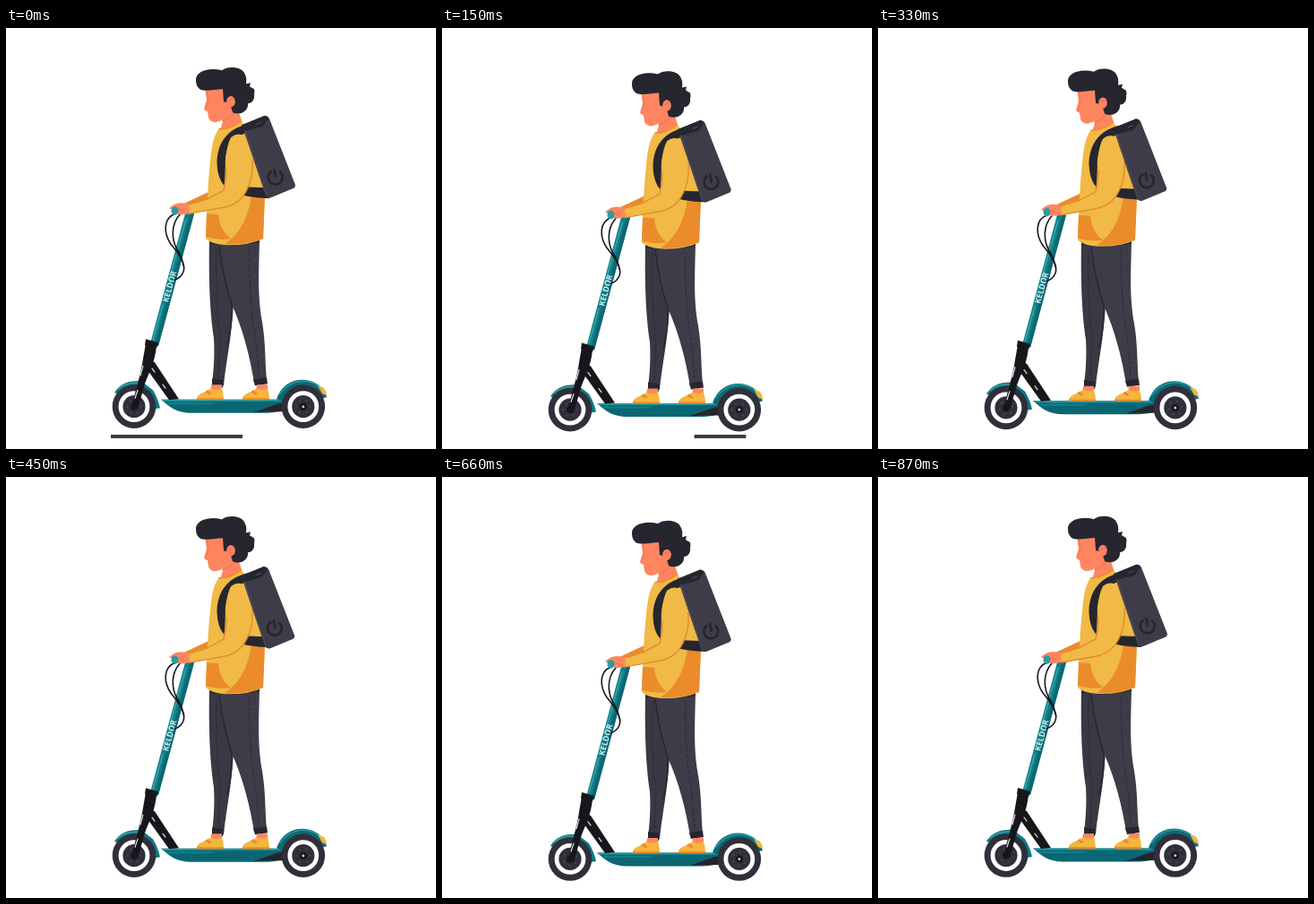
Recreate the animation shown at these times as an HTML page. Size 480 px wide and 470 px high, loop 900 ms.

```html
<!DOCTYPE html>
<html lang="en">
<head>
<meta charset="utf-8">
<title>Scooter ride</title>
<style>
  html, body { margin: 0; width: 100%; height: 100%; overflow: hidden; background: #fff; }
  svg { display: block; width: 480px; height: 470px; }
  .ink { fill: #26262f; }
  .cloth { fill: #3d3c48; }
  .skin { fill: #ff8561; }
  .shade { fill: #ea8b2c; }
  .shirt { fill: #f1b946; }
  .teal { fill: #0e7681; }
  .black { fill: #17171b; }
  .line { fill: none; stroke-linecap: round; stroke-linejoin: round; }
  text { font: 700 9px "Open Sans", Arial, sans-serif; fill: #d3eeee; }
</style>
</head>
<body>
<svg viewBox="0 0 480 470">
  <defs>
    <linearGradient id="glow">
      <stop offset="0" stop-color="#fdf3da" stop-opacity=".5"/>
      <stop offset=".5" stop-color="#f7dda3"/>
      <stop offset="1" stop-color="#edbd5c"/>
    </linearGradient>
    <g id="shoe">
      <path class="skin" d="M16 -2H28V6H15Z"/>
      <path d="M0 14C0 10 4 8 9 6L16 2Q22 5 28 2Q30 8 30 14Z" fill="#f6b53b"/>
      <path class="shade" d="M0 13H30V15H0ZM9 6L12 4L17 8L14 9Z"/>
    </g>
    <g id="wheel">
      <circle r="24.300" fill="#302f3a"/>
      <circle r="15" fill="#302f3a" stroke="#fff" stroke-width="4.800"/>
      <g class="spin"></g>
      <circle r="4" fill="#17171b"/>
      <circle r="1.500" fill="#c4c4ca"/>
    </g>
  </defs>

  <rect id="road" y="454" height="4" class="cloth"/>

  <g id="ride">
    <path id="beam" d="M136 190.500L170 196Q176 197 176 201.500T170 207L136 212.500Z" fill="url(#glow)"/>

    <!-- legs -->
    <path d="M227 236C226 285 228 320 232 346C233 365 232 380 230 397L243 399C246 370 252 345 254 306L262 238Z" fill="#393843"/>
    <path class="cloth" d="M238 236H283C282 278 281 300 286 328C290 352 289 374 291 393L277 396C272 365 265 338 252 308C247 288 240 262 238 236Z"/>
    <path class="line" d="M238 243C241 268 246 290 252 308C253 320 250 341 247 355" stroke="#26262f" stroke-width="1.300"/>
    <path class="line" d="M272 245C271 280 273 310 277 337Q281 365 282 389M235 246C234 290 236 325 239 345L237 391" stroke="#292832" stroke-width="1" stroke-dasharray="3 3"/>
    <path class="ink" d="M227 237L283 234V239Q260 244 228 241ZM230 391L243 393L242 401L230 399ZM276 392L291 390L292 397L278 399Z"/>

    <!-- deck -->
    <path d="M173 414.500H311V425Q304 429 292 429.500H207C190 429.500 183 423 173 414.500Z" fill="#0a6673"/>
    <path d="M173 414.500H311V416.500H176Z" fill="#2398a0"/>
    <path d="M178 418H236L228 420H181Z" fill="#11808a"/>
    <path d="M276 429L304 419H331V428H290Z" fill="#26252b"/>
    <use href="#shoe" x="213" y="400"/>
    <use href="#shoe" x="264" y="400"/>

    <!-- mudguards -->
    <path d="M302 414C307 399 319 392 332 392.500C345 393 355 401 358 412L349 414Q342 402 331 402Q316 402 309 417Z" fill="#0b6875"/>
    <path class="line" d="M305 409Q316 394 332 394Q344 394 352 402" stroke="#2398a0" stroke-width="1.500"/>
    <path d="M348 399L354 401Q358 405 358 410L353 408Z" fill="#f2b444"/>
    <path class="teal" d="M121 407C127 397 137 393 151 394L164 404Q170 414 172 424L166 425Q160 404 143 401Q131 401 125 408Z"/>
    <path class="line" d="M125 403Q134 395 149 396" stroke="#39a4a9" stroke-width="1.300"/>
  </g>

  <g id="wheels">
    <use href="#wheel" x="143" y="422.500"/>
    <use href="#wheel" x="331.800" y="422.500"/>
  </g>

  <g id="rider">
    <!-- fork and stem -->
    <path class="black" d="M157 369L166 373L193 414L182 415L159 383Z"/>
    <path class="black" d="M156 352L168 355C166 374 160 383 155 397L147 425L140 424C145 402 151 385 153 369Z"/>
    <path class="line" d="M153 377L150 388M163 380L166 384M175 398L178 402M147 404L144 413" stroke="#dedee2" stroke-width="1.200"/>
    <path d="M200.500 205L210 207L170 355L161 352Z" fill="#11808a"/>
    <path d="M206 206L210 207L170 355L166 354Z" fill="#0c6872"/>
    <path class="line" d="M201 213L182 280M175 309L164 348" stroke="#3aa8ad" stroke-width="1.300"/>
    <path class="black" d="M156 347L170 351L168 357L155 354Z"/>
    <text transform="translate(181 306.500) rotate(-74.500)">KELDOR</text>
    <path class="line" d="M189 207C175 212 176 229 184 241C195 254 201 264 198 272Q195 279 188 281M194 208C184 219 185 235 190 245Q197 256 198 265" stroke="#17171b" stroke-width="1.600"/>

    <!-- far arm, neck, face -->
    <path class="shade" d="M198 196L230 181V196L203 203Z"/>
    <path class="skin" d="M241 94L258 88L264 106Q252 116 239 115L242 104Z"/>
    <path class="line" d="M242 103.500Q250 101 254 95" stroke="#f17450" stroke-width="1.300"/>
    <path class="skin" d="M222 66L224 80L221 90Q222 92 225 93L226 100Q228 105 234 105Q244 103 252 94L258 66Z"/>
    <path class="line" d="M224 71L226 80L223 88" stroke="#f77653" stroke-width="1.300"/>
    <path class="ink" d="M212 58.500C211 49 225 43 241 47C247 42 264 42 267 52Q269 56 268 62L273 61L272 65L277 68Q278 71 277 74C278 80 274 84 270 84C271 92 262 98 253 94L250 84L243 82L242 68C234 68 224 71 217 68.500Q212 65 212 58.500Z"/>
    <ellipse class="skin" cx="251" cy="82" rx="4.800" ry="6.200"/>
    <path class="line" d="M249 82Q250 78 254 79" stroke="#e96d4b" stroke-width="1.200"/>

    <!-- torso -->
    <path class="shirt" d="M238 112Q250 113 262 103L273 116L289 184L287 235Q270 243 245 242Q229 241 223 235C224 205 225 176 228 148C230 129 232 119 238 112Z"/>
    <path class="shade" d="M224 207L237 208C238 220 243 229 251 235Q237 237 223 233ZM274 186H289L287 235Q270 242 244 241C262 229 271 210 274 186Z"/>
    <path class="line" d="M238 112.500Q250 113 262 104" stroke="#ea8b2c" stroke-width="1.500"/>

    <!-- straps -->
    <path class="ink" d="M270 107C247 112 236 128 235.500 150C236 165 240 174 249 181L253 175C244 164 243 148 247 135Q253 122 270 116ZM252 175Q267 178 294 178V190Q268 189 252 183Z"/>

    <!-- near arm -->
    <path class="shirt" d="M251 122C263 112 274 125 275 141C276 158 273 174 265 187C260 194 253 198 244 200L204 207L203 198L226 191L243 181C246 164 243 137 251 122Z"/>
    <path class="line" d="M275 147C276 162 272 177 265 187C260 194 253 198 244 200L205 207M243 181L224 191M243 181Q246 169 246 157" stroke="#e28a2b" stroke-width="1.300"/>
    <path class="skin" d="M204 196L205 207Q195 209 190 207L186 203L182 201Q188 195 195 195Z"/>
    <ellipse cx="188.500" cy="204" rx="4" ry="4.800" fill="#2d9ba1"/>
    <path class="line" d="M193 202L198 204" stroke="#e96d4b" stroke-width="1"/>
  </g>

  <g id="bag">
    <path class="cloth" d="M264 108L288 98Q292 97 294 101L323 175Q323 178 320 179L296 189Q292 190 290 187L265 113Z"/>
    <path class="ink" d="M263 108L289 97.500L293 101L286 110L266 115Z"/>
    <path class="line" d="M267 115L291 187M280 107L285 105" stroke="#4c4b57" stroke-width="1.300"/>
    <path class="line" d="M296 160A8 8 0 1 0 306 160.500M299.500 158L301 166" stroke="#25252e" stroke-width="2.600"/>
  </g>
</svg>
<script>
const LOOP = 900, STEP = 30;
const $ = id => document.getElementById(id);
const wave = (t, period, low) => (1 - Math.cos((t - low) / period * 2 * Math.PI)) / 2;
const shift = (id, x, y) => $(id).setAttribute('transform', `translate(${x} ${y})`);

const spin = document.querySelector('.spin');
for (let i = 0; i < 6; i++) {
  const a = i * Math.PI / 3;
  const dot = document.createElementNS('http://www.w3.org/2000/svg', 'circle');
  dot.setAttribute('cx', 7.6 * Math.cos(a));
  dot.setAttribute('cy', 7.6 * Math.sin(a));
  dot.setAttribute('r', 1);
  dot.setAttribute('fill', '#4b4a55');
  spin.append(dot);
}

function draw(t) {
  const bob = wave(t, LOOP / 2, -30);
  const y = 5 * bob;
  shift('ride', 0, y);
  shift('rider', 0, y);
  shift('wheels', 0, 4 * bob);
  const lag = wave(t, LOOP, -40);
  shift('bag', -0.8 * lag, y + 2.2 * lag);
  spin.setAttribute('transform', `rotate(${-360 * t / LOOP})`);

  // the road mark shrinks towards its right end
  const p = Math.min(t / 247, 1);
  const tail = 117 + 271 * p, head = 264 + 124 * p;
  $('road').setAttribute('x', tail);
  $('road').setAttribute('width', head - tail);

  $('beam').setAttribute('opacity', t >= 510 && t < 660 ? 1 : 0);
}

function tick(now) {
  draw(Math.floor(now % LOOP / STEP) * STEP);
  requestAnimationFrame(tick);
}
draw(0);
requestAnimationFrame(tick);
</script>
</body>
</html>
```
